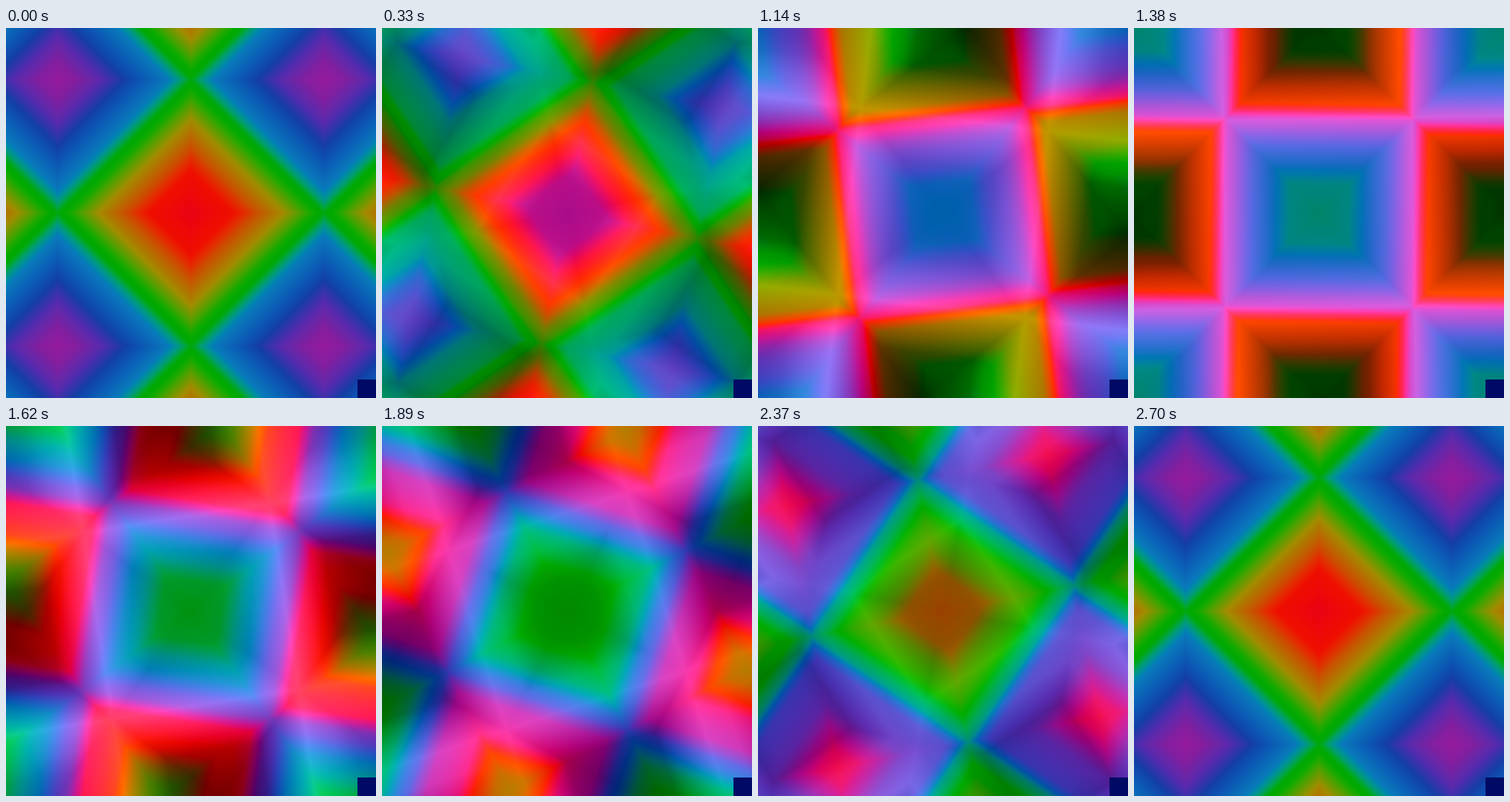
Recreate the animation shown at these times as an HTML page with a canvas. Size 500 by 500 pixels, loop 2730 ms.

```html
<!DOCTYPE html>
<html>
<head>
<meta charset="utf-8">
<style>
  html, body { margin: 0; width: 100%; height: 100%; overflow: hidden; background: #000a64; }
  canvas { display: block; width: 500px; height: 500px; }
</style>
</head>
<body>
<canvas id="stage" width="500" height="500"></canvas>
<script>
const SIZE = 500, HALF = 250, CELL = 360, LEVELS = 360, STEP = 30, STEPS = 91;
const RAD = Math.PI / 180;
const ctx = document.getElementById('stage').getContext('2d');
const image = ctx.createImageData(SIZE, SIZE);
const pixels = image.data;
const cb = new Float32Array(LEVELS + 1), cr = new Float32Array(LEVELS + 1), luma = new Float32Array(LEVELS + 1);

// Linear interpolation through [position, value] points.
function curve(points, x) {
  let i = 1;
  while (i < points.length - 1 && points[i][0] < x) i++;
  const [x0, y0] = points[i - 1], [x1, y1] = points[i];
  return y0 + (y1 - y0) * (x - x0) / (x1 - x0);
}

// Hue offset across the lattice: -1 cell centre, 0 cell border, 1 neighbour's centre.
const HUE = [[-1, -135], [-.68, -128], [-.5, -98], [-.3, -75], [-.2, -52], [-.1, -22], [0, 0],
  [.08, 40], [.17, 70], [.33, 80], [.5, 93], [.67, 132], [.85, 160], [1, 169]];

function prepare(step) {
  const phase = Math.cos(step * 4 * RAD);
  const light = [[-1, 73], [-.68, 80], [-.5, 95 + 5 * phase], [-.3, 118 + 6 * phase], [0, 119 - 25 * phase],
    [.17, 102 - 7 * phase], [.5, 53 + 8 * phase], [.7, 50 + 22 * phase], [1, 44 + 34 * phase]];
  for (let i = 0; i <= LEVELS; i++) {
    const s = i / LEVELS * 2 - 1;
    const hue = 240 - 4 * step + curve(HUE, s);
    const lobe = centre => Math.max(0, Math.cos((hue - centre) * RAD));
    const chroma = 92 - 34 * lobe(20) + 30 * lobe(115) ** 2;
    cb[i] = chroma * Math.cos(hue * RAD);
    cr[i] = chroma * Math.sin(hue * RAD);
    luma[i] = curve(light, s);
  }
}

const fold = v => Math.abs(v - CELL * Math.round(v / CELL));
const level = (u, v) => (fold(u) + fold(v)) * LEVELS / CELL + .5 | 0;

function draw(step) {
  prepare(step);
  const c = Math.cos(step * RAD), s = Math.sin(step * RAD);
  let p = 0;
  for (let py = 0; py < SIZE; py++) {
    const y = py + .5 - HALF, yc = y * c, ys = y * s;
    for (let px = 0; px < SIZE; px++) {
      const x = px + .5 - HALF, xc = x * c, xs = x * s;
      // Hue turns clockwise, lightness counter-clockwise.
      const h = level(xc + ys, yc - xs);
      const Y = luma[level(xc - ys, yc + xs)];
      const k = Math.min(1, .5 + Y / 140);
      const b = cb[h] * k, r = cr[h] * k;
      pixels[p++] = Y + 1.402 * r;
      pixels[p++] = Y - .344 * b - .714 * r;
      pixels[p++] = Y + 1.772 * b;
      pixels[p++] = 255;
    }
  }
  ctx.putImageData(image, 0, 0);
  ctx.fillStyle = '#000a64';
  ctx.fillRect(475, 475, 25, 25);
}

let shown = -1;
function tick() {
  const step = Math.floor(performance.now() / STEP) % STEPS;
  if (step !== shown) draw(shown = step);
  requestAnimationFrame(tick);
}
tick();
</script>
</body>
</html>
```
